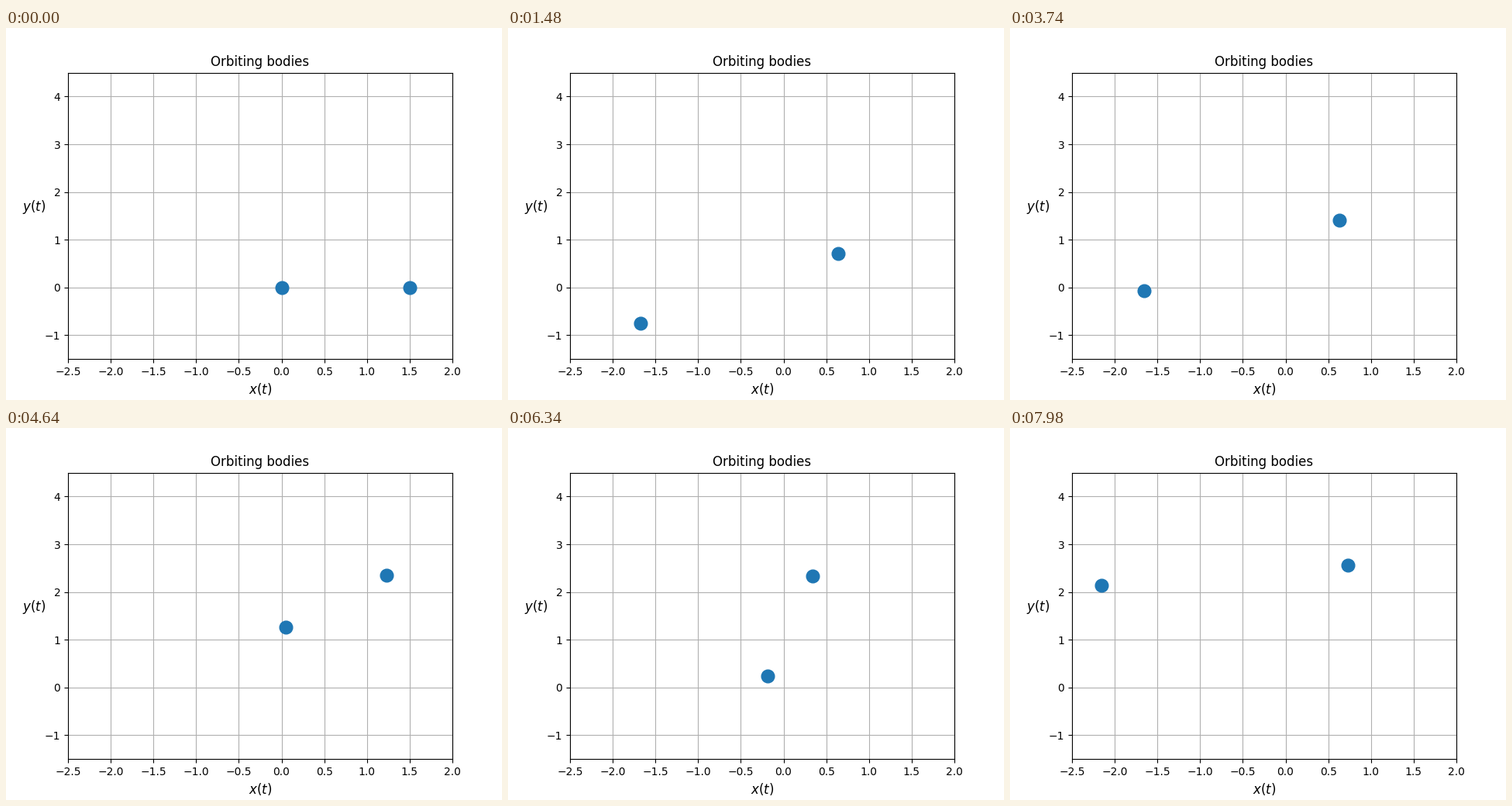
A matplotlib script for the animation above (8000 ms loop, 640 by 480 pixels).

```python
import numpy as np
import matplotlib.pyplot as plt
from matplotlib.animation import FuncAnimation

FRAMES = 400
DT = 0.075045                 # simulated time per frame
M1, M2 = 5.0, 1.0             # masses, with G = 1
R0 = 1.5                      # starting separation, the closest approach
V1, V2 = -0.3, 2.0            # starting velocities along y

MU = M1 + M2
ECC = R0 * (V2 - V1) ** 2 / MU - 1
A = R0 / (1 - ECC)
B = A * np.sqrt(1 - ECC ** 2)
RATE = np.sqrt(MU / A ** 3)
V_CM = (M1 * V1 + M2 * V2) / MU


def bodies(i):
    """Positions of both bodies, from Kepler's equation."""
    t = i * DT
    mean = RATE * t
    ecc_anom = mean + ECC * np.sin(mean)
    for _ in range(8):
        err = ecc_anom - ECC * np.sin(ecc_anom) - mean
        ecc_anom -= err / (1 - ECC * np.cos(ecc_anom))
    sep = np.array([A * (np.cos(ecc_anom) - ECC), B * np.sin(ecc_anom)])
    center = np.array([M2 * R0 / MU, V_CM * i * 0.075])
    return center - sep * M2 / MU, center + sep * M1 / MU


fig, ax = plt.subplots(figsize=(6.4, 4.8), dpi=100)
ax.set_xlim(-2.5, 2)
ax.set_ylim(-1.5, 4.5)
ax.grid(True)
ax.set_title("Orbiting bodies")
ax.set_xlabel("$x(t)$", fontsize=12)
ax.set_ylabel("$y(t)$", fontsize=12, rotation=0, labelpad=10)
dots, = ax.plot([], [], "o", color="C0", markersize=12)


def update(i):
    dots.set_data(*np.transpose(bodies(i)))
    return dots,


anim = FuncAnimation(fig, update, frames=FRAMES, interval=20,
                     repeat=True, repeat_delay=0, blit=True)
plt.show()
```
